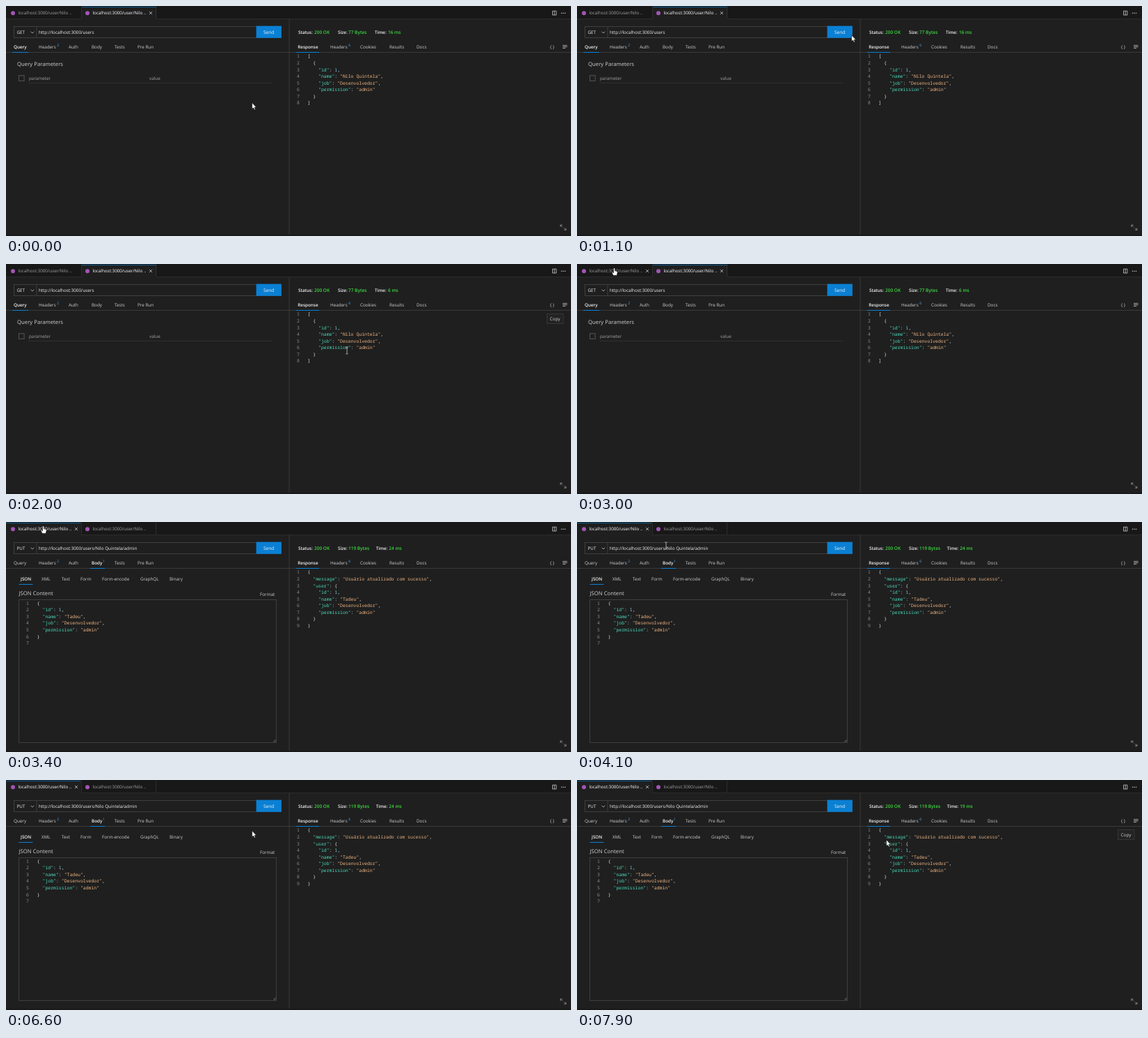
An HTML page for the animation above (8000 ms loop, 812 by 330 pixels).

```html
<!DOCTYPE html>
<html lang="pt">
<head>
<meta charset="utf-8">
<title>REST client</title>
<style>
html, body { margin: 0; width: 100%; height: 100%; overflow: hidden; background: #1f1f1f; }
svg { display: block; width: 812px; height: 330px; }
text { font: 6.32px "Open Sans", "Noto Sans", sans-serif; fill: #d0d0d0; white-space: pre; text-rendering: geometricPrecision; }
.b { font-weight: 600; fill: #f4f4f4; }
.w { fill: #f4f4f4; }
.dim { fill: #a4a4a4; }
.ok { font-weight: 600; font-size: 6.5px; fill: #3ddc40; }
.sup { font-size: 5.2px; fill: #45a6f5; }
.h { font-size: 7.75px; }
.code { font: 500 6.47px "Noto Sans Mono", "DejaVu Sans Mono", monospace; fill: #e4e4e4; }
.num { fill: #8c8c8c; text-anchor: middle; }
.key { fill: #4bdcbc; }
.str { fill: #eeb380; }
.int { fill: #7cd2ea; }
.line { fill: none; stroke: #3f3f3f; }
.icon { fill: none; stroke: #c8c8c8; stroke-width: .8; }
.blue { fill: #0a80d4; }
</style>
</head>
<body>
<svg id="stage" viewBox="0 0 812 330"></svg>
<script>
const LOOP = 8000, STEP = 100;
const USER = "Nilo Quintela", NEW_NAME = "Tadeu";
const TAB_TITLE = "localhost:3000/user/Nilo ..";

const text = (x, y, s, cls = "", extra = "") => `<text x="${x}" y="${y}" class="${cls}" ${extra}>${s}</text>`;
const rect = (x, y, w, h, attrs) => `<rect x="${x}" y="${y}" width="${w}" height="${h}" ${attrs}/>`;
const path = (d, cls, extra = "") => `<path d="${d}" class="${cls}" ${extra}/>`;
const group = (id, body) => `<g id="${id}">${body}</g>`;
const underline = (x, y, w) => rect(x, y, w, 1, 'class="blue"');
const cross = (id, x) => path(`M${x - 2.1} 7.9l4.2 4.2m0-4.2l-4.2 4.2`, "icon", `id="${id}"`);

const highlight = line => line.replace(/"[^"]*"(:?)|\d+/g, (s, colon) =>
  colon ? `<tspan class="key">${s.slice(0, -1)}</tspan>:`
        : `<tspan class="${s[0] === '"' ? "str" : "int"}">${s}</tspan>`);

function code(lines, numberX, x, y) {
  return lines.map((line, i) => {
    const base = (y + i * 9.57).toFixed(2);
    return text(numberX, base, i + 1, "code num") + text(x, base, highlight(line), "code");
  }).join("");
}

const record = (name, indent) => [
  '"id": 1,', `"name": "${name}",`, '"job": "Desenvolvedor",', '"permission": "admin"'
].map(s => " ".repeat(indent) + s);

const nav = (items, y, active) => items.map(([x, label]) =>
  text(x, y, label, label === active ? "b" : "")).join("");

const requestNav = active => nav([[11, "Query"], [47, "Headers"], [90, "Auth"], [123, "Body"],
  [156, "Tests"], [189, "Pre Run"]], 60.8, active) + text(73.3, 58.4, "2", "sup");

const stats = (size, timeX) => text(477, 40, "Size:", "b") + text(492, 40, size, "ok") + text(timeX, 40, "Time:", "b");

const frame =
  rect(0, 0, 812, 18.5, 'fill="#181818"') +
  rect(0, 18, 812, 1, 'fill="#2b2b2b"') +
  rect(0, 328, 812, 2, 'fill="#191919"') +
  group("activeTab", rect(0, 1, 107.5, 18, 'fill="#1f1f1f"') + rect(0, 1, 107.5, 1, 'class="blue" opacity=".6"')) +
  path("M108.5 1V18M215.5 1V18", "line", 'stroke-opacity=".6"') +
  [0, 107].map((x, i) => `<circle cx="${x + 10}" cy="10.2" r="3" fill="#a355b4"/>` +
    text(x + 17.4, 12.4, TAB_TITLE, "", `id="title${i}"`) + cross(`close${i}`, x + 101)).join("") +
  path("M785.5 7.2h5.4v5.8h-5.4zM788.2 7.2v5.8", "icon") +
  [798.5, 801, 803.5].map(x => `<circle cx="${x}" cy="10.3" r=".75" fill="#c8c8c8"/>`).join("") +
  path("M407 19V328M0 66.5H812", "line", 'stroke-opacity=".85"') +
  rect(11.5, 29.5, 384, 16, 'class="line"') + path("M44 29.5V45.5", "line") +
  path("M35.6 36.7l2.3 2.3 2.3-2.3", "icon") +
  rect(359.6, 28.6, 36.2, 17.2, 'class="blue" id="send"') +
  text(377.6, 39.8, "Send", "w", 'text-anchor="middle" style="font-size:6.5px"') +
  text(420, 40, "Status:", "b") + text(443, 40, "200 OK", "ok") +
  nav([[419.3, "Response"], [466, "Headers"], [509, "Cookies"], [551, "Results"], [590, "Docs"]], 60.8, "Response") +
  text(492.2, 58.4, "6", "sup") + underline(417, 66, 33) +
  text(781.8, 60.8, "{ }") +
  path("M800 56.5h6.5M800 58.5h6.5M800 60.5h4.2", "icon") +
  path("M796.8 317v-2.8h2.8M796.8 314.2l3 3M804.8 318.6v2.8h-2.8M804.8 321.4l-3-3", "icon", 'stroke-opacity=".7"');

const queryView =
  text(15.5, 39.8, "GET", "w") + text(47, 39.8, "http://localhost:3000/users", "w") +
  requestNav("Query") + underline(9, 66, 23) +
  text(16, 86, "Query Parameters", "h") +
  rect(18.5, 99.8, 7.6, 7.6, 'class="line" style="stroke:#555"') +
  text(33, 105.7, "parameter", "dim") + text(206, 105.7, "value", "dim") +
  path("M33 110.5H383", "line", 'stroke-dasharray="1 1"') +
  stats("77 Bytes", 530) +
  code(["[", "  {", ...record(USER, 4), "  }", "]"], 420, 433.5, 74.4);

const bodyView =
  text(15.5, 39.8, "PUT", "w") + text(47, 39.8, `http://localhost:3000/users/${USER}/admin`, "w") +
  requestNav("Body") + text(139, 58.4, "1", "sup") + underline(121, 66, 21) +
  nav([[21, "JSON"], [51, "XML"], [80, "Text"], [107, "Form"], [138, "Form-encode"],
    [193, "GraphQL"], [235, "Binary"]], 84.4, "JSON") +
  underline(18.5, 89, 20) +
  text(18.5, 105, "JSON Content", "h") + text(365, 106.3, "Format") +
  rect(18.5, 111.5, 370, 205, 'class="line"') +
  path("M384.5 315.5l3-3M386.5 315.5l1-1", "icon", 'stroke-opacity=".7"') +
  stats("119 Bytes", 531.7) +
  code(["{", ...record(NEW_NAME, 2), "}", ""], 31, 44.8, 118.7) +
  code(["{", '  "message": "Usuário atualizado com sucesso",', '  "user": {',
    ...record(NEW_NAME, 4), "  }", "}"], 420, 433.5, 74.4);

const copyButton = rect(777.5, 71.5, 23.5, 14, 'fill="#232323" stroke="#363636"') + text(781.6, 80.8, "Copy");

const outline = 'fill="#fff" stroke="#000" stroke-width=".6" stroke-linejoin="round"';
const cursors =
  path("M-1.4-1.2v9l2-1.8 1.4 3.1 1.5-.7-1.4-3h2.8z", "", `id="arrow" ${outline}`) +
  path("M-1 .8Q0-.4 1 .8V4.3L4 5Q4.9 5.3 4.7 6.6L3.8 11H-1.2L-3.4 7.2Q-3.4 6-2.2 6.4L-1 7.4Z", "", `id="hand" ${outline}`) +
  path("M-1.8-5H-.5L0-4.5.5-5H1.8M0-4.5V4.5M-1.8 5H-.5L0 4.5.5 5H1.8", "icon", 'id="beam"');

document.getElementById("stage").innerHTML = frame + group("query", queryView) + group("body", bodyView) +
  text(0, 40, "", "ok", 'id="elapsed"') + group("copy", copyButton) + group("pointer", cursors);

const el = id => document.getElementById(id);
const show = (id, on) => el(id).style.display = on ? "" : "none";

// [ms, x, y, cursor shape from here on]
const pointerPath = [
  [0, 355, 140, "arrow"], [700, 355, 140, "arrow"], [1100, 396, 43, "arrow"], [1200, 382, 36, "hand"],
  [1600, 380, 36, "hand"], [1700, 402, 58, "arrow"], [1900, 480, 118, "beam"], [2000, 490, 124, "beam"],
  [2500, 496, 118, "beam"], [2700, 330, 62, "arrow"], [2900, 76, 15, "hand"], [3000, 53.5, 5.5, "hand"],
  [3500, 53.5, 5.5, "hand"], [3700, 80, 22, "arrow"], [3900, 118, 34, "beam"], [4100, 128, 34, "beam"],
  [4300, 120, 33, "beam"], [4700, 188, 33, "beam"], [4900, 208, 34, "beam"], [5200, 190, 34, "beam"],
  [5400, 120, 70, "arrow"], [5700, 64, 118, "beam"], [6000, 100, 135, "beam"], [6300, 150, 137, "beam"],
  [6600, 355, 74, "arrow"], [6700, 371, 42, "arrow"], [6800, 378, 33, "hand"], [6900, 378, 32, "hand"],
  [7500, 378, 33, "hand"], [7700, 378, 33, "hand"], [7800, 410, 60, "arrow"], [7900, 446, 87, "arrow"]
];

function pointerAt(t) {
  const i = pointerPath.findLastIndex(p => p[0] <= t);
  const [t0, x0, y0, shape] = pointerPath[i];
  const [t1, x1, y1] = pointerPath[i + 1] || [LOOP, x0, y0];
  const k = (t - t0) / (t1 - t0), ease = k * k * (3 - 2 * k);
  return { x: x0 + (x1 - x0) * ease, y: y0 + (y1 - y0) * ease, shape };
}

function render(time) {
  const t = Math.floor(time % LOOP / STEP) * STEP;
  const { x, y, shape } = pointerAt(t);
  const first = t >= 3200;
  const overTab = y < 18 && x < 108;
  const overSend = shape === "hand" && x > 360 && x < 396 && y > 28 && y < 46;

  show("query", !first);
  show("body", first);
  el("activeTab").setAttribute("transform", `translate(${first ? 0 : 109})`);
  el("title0").style.fill = first ? "#fff" : "#a2a2a2";
  el("title1").style.fill = first ? "#a2a2a2" : "#fff";
  show("close0", first || overTab);
  show("close1", !first);

  el("elapsed").setAttribute("x", first ? 550.3 : 549);
  el("elapsed").textContent = (first ? (t < 7100 ? 24 : 19) : (t < 1500 ? 16 : 6)) + " ms";
  el("send").style.fill = overSend ? "#026ec1" : "";
  show("copy", x > 408 && y > 67);

  el("pointer").setAttribute("transform", `translate(${x.toFixed(1)} ${y.toFixed(1)})`);
  for (const s of ["arrow", "hand", "beam"]) show(s, s === shape);
}

const start = performance.now();
function tick() {
  render(performance.now() - start);
  requestAnimationFrame(tick);
}
tick();
</script>
</body>
</html>
```
